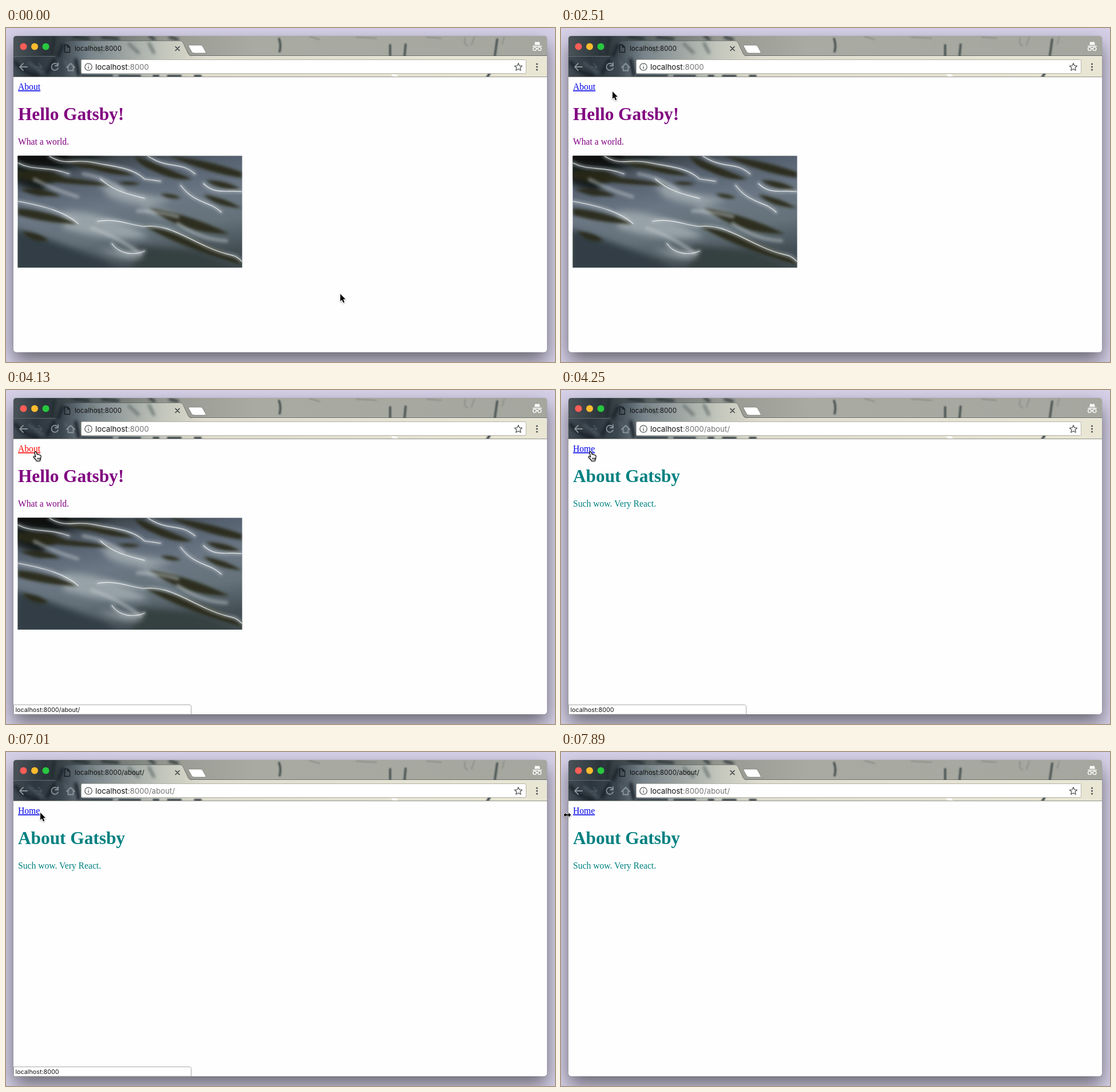
Write an HTML page that moves like this. It is 959 px wide and 584 px high and loops after 8 s.

```html
<!DOCTYPE html>
<html lang="en">
<head>
<meta charset="utf-8">
<title>localhost:8000</title>
<style>
  html, body { margin: 0; width: 100%; height: 100%; overflow: hidden; background: #d6d1e8; }
  #window { position: absolute; left: 13px; top: 14px; width: 932px; height: 553px; border-radius: 5px;
    background: #fefefe; box-shadow: 0 0 1px rgba(0,0,0,.5), 0 15px 32px rgba(0,0,0,.5); }
  svg { position: absolute; left: 0; top: 0; display: block; }
  .ui { font-family: Inter, Roboto, sans-serif; }
  .page { font: 15.65px "Liberation Serif", "Times New Roman", serif; }
  .heading { font-size: 31.3px; font-weight: bold; }
  .link { fill: #00e; text-decoration: underline; }
  .home { fill: purple; }
  .about { fill: teal; }
  .line { fill: none; stroke-linecap: round; stroke-linejoin: round; }
</style>
</head>
<body>
<div id="window"></div>
<svg width="959" height="584" viewBox="0 0 959 584">
  <defs>
    <clipPath id="header"><path d="M13 86V19q0-5 5-5H940q5 0 5 5V86Z"/></clipPath>
    <clipPath id="photoFrame"><rect x="20.5" y="223.5" width="392" height="195.5"/></clipPath>
    <linearGradient id="strip">
      <stop offset="0" stop-color="#4a5358"/><stop offset=".06" stop-color="#2b343a"/>
      <stop offset=".13" stop-color="#4c5657"/><stop offset=".2" stop-color="#757b77"/>
      <stop offset=".3" stop-color="#999b93"/><stop offset=".45" stop-color="#a9aaa1"/>
      <stop offset="1" stop-color="#a5a69e"/>
    </linearGradient>
    <linearGradient id="toolbar" gradientUnits="userSpaceOnUse" x1="13" x2="945" y1="0" y2="0">
      <stop offset="0" stop-color="#414b53"/><stop offset=".04" stop-color="#2d363e"/>
      <stop offset=".09" stop-color="#3a454d"/><stop offset=".14" stop-color="#77838a"/>
      <stop offset=".2" stop-color="#98a09f"/><stop offset=".28" stop-color="#c3c6bc"/>
      <stop offset=".36" stop-color="#dedccd"/><stop offset="1" stop-color="#e9e6d4"/>
    </linearGradient>
    <linearGradient id="water" x1=".1" y1="0" x2=".4" y2="1">
      <stop offset="0" stop-color="#2b302f"/><stop offset=".25" stop-color="#566170"/>
      <stop offset=".5" stop-color="#6b7784"/><stop offset=".75" stop-color="#65727a"/>
      <stop offset="1" stop-color="#434e55"/>
    </linearGradient>
    <filter id="soft"><feGaussianBlur stdDeviation="1.3"/></filter>
    <filter id="blur"><feGaussianBlur stdDeviation="2.4"/></filter>
    <filter id="haze"><feGaussianBlur stdDeviation="6"/></filter>
    <filter id="lift" x="-50%" y="-50%" width="200%" height="200%">
      <feDropShadow dx="0" dy="1" stdDeviation=".8" flood-opacity=".4"/>
    </filter>
  </defs>

  <!-- browser frame -->
  <g clip-path="url(#header)">
    <rect x="13" y="14" width="932" height="36" fill="url(#strip)"/>
    <g filter="url(#blur)" class="line" stroke="#1c252b" stroke-width="4">
      <path d="M84 16l-4 32M118 15l26 4M168 16l28 3M251 14l8 6M286 16l14 4"/>
    </g>
    <g filter="url(#soft)" class="line" stroke="#8c8e87" stroke-width="2">
      <path d="M477 19q4 10 1 22M671 30v18M698 29l-2 22M858 20l-4 28" stroke="#4f5959" stroke-width="4"/>
      <path d="M802 17q-3 12 4 14M818 16l-5 14M870 16l-3 12M530 15l18 5M612 16l35 2M735 16l25 2"/>
    </g>
    <path d="M13 49H85q3 0 5-4l7-18q2-5 6-5H303q5 0 7 5l8 18q2 4 6 4H945V86H13Z" fill="url(#toolbar)"/>
    <g filter="url(#blur)" class="line" stroke="#1b242b" stroke-width="6">
      <path d="M99 30l-8 18M17 60q12 18 38 23M84 56l-12 22M122 56l5 26"/>
      <path d="M146 27l20 14M215 28l16 15M250 27l8 16" stroke="#6e7977" stroke-width="5"/>
      <path d="M40 61l24 17M103 58l14 18" stroke="#586570" stroke-width="3"/>
    </g>
    <g filter="url(#soft)" class="line" stroke="#39434a" stroke-width="4">
      <path d="M133 83.500h52M198 84h36M258 84h8M283 84h22M330 84h10M845 79l-5 8"/>
    </g>
    <path d="M673 81h9l3 4h-9Z" fill="#fff"/>
    <path d="M13 48.500H85q3 0 5-4l7-17q2-5 6-5H303q5 0 7 5l8 17q2 4 6 4H945" class="line" stroke="#30383b" stroke-opacity=".5"/>
    <path d="M325 49.500H945" stroke="#f2f2ea"/>
    <path d="M13 49.500H86" stroke="#9aa2a4" stroke-opacity=".5"/>
    <path d="M13 85.500H945" stroke="#92938b"/>
  </g>
  <path d="M320 30h20q3 0 4 3l5 9q1 2-2 2h-18q-4 0-5-3l-5-9q-1-2 1-2Z" fill="#fff" stroke="#6e726d" stroke-width=".7"/>
  <circle cx="30.5" cy="32.5" r="6" fill="#fc5d57"/>
  <circle cx="50" cy="32.5" r="6" fill="#fdbc2e"/>
  <circle cx="69.5" cy="32.5" r="6" fill="#28c840"/>

  <g class="line" stroke-width="1.3">
    <path d="M102.5 29.5h5l4 4v9h-9ZM107.5 29.5v4h4" stroke="#161c20"/>
    <path d="M296 32.5l7 7M303 32.5l-7 7" stroke="#33383a" stroke-width="1.5"/>
    <g stroke="#8a949b" stroke-width="1.8">
      <path d="M37 68H24M30 62l-6 6 6 6"/>
      <path d="M50 68H62M57 62l6 6-6 6" stroke="#46515a"/>
      <path d="M90 64a6 6 0 1 0 1 6M91 61v5h-5"/>
      <path d="M106 69l7-7 7 7M108.500 68v6.500h9V68"/>
    </g>
  </g>
  <g fill="#fff">
    <path d="M920 31h16v1.500h-16ZM923 29.500l1.500-5.500q3.500 1.500 7 0l1.500 5.500Z"/>
    <g class="line" stroke="#fff" stroke-width="1.4">
      <circle cx="923.500" cy="36.500" r="2.900" fill="none"/><circle cx="932" cy="36.500" r="2.900" fill="none"/><path d="M926.500 36q1.300-1 2.600 0"/>
    </g>
  </g>
  <rect x="131.5" y="55.500" width="777" height="24" rx="2" fill="#fff" stroke="#b4b3a8"/>
  <g class="line" stroke="#55585a" stroke-width="1.3">
    <circle cx="144" cy="68" r="6.200"/><path d="M144 67.500v3.500M144 64.700v.1"/>
    <path d="M895 61.500l1.900 4.400 4.800.4-3.600 3.200 1.100 4.700-4.200-2.500-4.200 2.500 1.100-4.700-3.600-3.200 4.800-.4Z"/>
  </g>
  <g fill="#505254"><circle cx="927.500" cy="63" r="1.600"/><circle cx="927.500" cy="68" r="1.600"/><circle cx="927.500" cy="73" r="1.600"/></g>
  <text id="title" class="ui" x="120" y="40" font-size="11.600" fill="#111"></text>
  <text class="ui" x="156" y="72.500" font-size="13.250" fill="#111">localhost<tspan id="address" fill="#757575"></tspan></text>

  <!-- pages -->
  <g id="homePage" class="page">
    <text id="aboutLink" class="link" x="21" y="108">About</text>
    <text class="home heading" x="21" y="161">Hello Gatsby!</text>
    <text class="home" x="21" y="204">What a world.</text>
    <g clip-path="url(#photoFrame)">
      <rect x="20" y="223" width="393" height="197" fill="url(#water)"/>
      <g filter="url(#haze)">
        <path d="M15 218H190L90 250 60 290 15 270Z" fill="#171b1b"/>
        <path d="M15 350L90 375 170 405 200 425H15Z" fill="#333d44"/>
        <path d="M230 380L330 390 420 425H220Z" fill="#363f40"/>
        <path d="M160 270q60 20 130 30-50 20-110-5ZM100 320q80 0 150 45-70 10-150-15ZM230 310q50 5 70 20-40 5-70-20ZM160 385q30 5 80 10-20 20-80-10Z" fill="#97a2a8"/>
      </g>
      <g filter="url(#blur)" fill="#282a14" fill-opacity=".92">
        <path d="M15 220H105Q120 238 90 238 60 240 21 232Z" fill="#0c0e09"/>
        <path d="M108 232Q165 233 225 257 195 260 150 246 120 243 108 232Z"/>
        <path d="M21 250Q70 246 105 262 150 266 190 275 140 276 90 270 50 272 21 262Z"/>
        <path d="M195 270q20-4 40 2-18 6-40-2Z"/>
        <path d="M285 224Q350 230 412 252V262Q355 254 285 224Z"/>
        <path d="M225 224Q275 242 325 264 295 268 258 250 232 240 225 224Z"/>
        <path d="M350 266Q385 266 410 282 370 284 350 266ZM345 291Q380 296 412 315 365 312 345 291ZM270 290q20-2 36 7-22 4-36-7Z"/>
        <path d="M21 315Q75 320 128 343 70 341 21 327ZM28 356q30 1 46 16-28 4-46-16ZM25 282q45-4 70 12-45 2-70-12Z"/>
        <path d="M250 315Q320 325 390 360 310 360 250 315ZM240 345Q300 352 412 407V414Q300 382 240 345Z"/>
      </g>
      <g filter="url(#blur)" class="line" stroke="#c2cacd" stroke-opacity=".5" stroke-width="6">
        <path d="M135 255Q175 262 205 284M50 265Q85 283 125 295M230 320Q265 320 300 330M150 350Q195 365 235 395M300 342Q340 370 385 372"/>
        <path id="crests" d="M21 236C48 250 72 241 110 255M76 224C104 242 120 228 152 235S220 243 242 264L270 268M248 224C284 248 304 232 330 255M345 272C365 292 385 283 412 286M165 264C190 286 212 290 242 298M21 303C70 312 104 322 126 342M160 338C190 332 215 344 240 347M240 347C280 343 302 360 350 382S393 390 412 408M185 377C198 396 224 398 242 390M305 275C330 308 355 302 376 322"/>
      </g>
      <use href="#crests" class="line" stroke="#fff" stroke-opacity=".8" stroke-width="1.2"/>
    </g>
  </g>
  <g id="aboutPage" class="page">
    <text class="link" x="21" y="108">Home</text>
    <text class="about heading" x="21" y="161">About Gatsby</text>
    <text class="about" x="21" y="204">Such wow. Very React.</text>
  </g>

  <g id="status">
    <path d="M13.500 567V550.500H320.500q3 0 3 3V567Z" fill="#fff" stroke="#a9a9a9"/>
    <text id="statusText" class="ui" x="16.500" y="562.800" font-size="10.750" fill="#111"></text>
  </g>

  <!-- pointers, hotspot at 0,0 -->
  <g id="pointer" filter="url(#lift)" stroke-linejoin="round">
    <path id="arrow" d="M0 0V12.800L2.900 10.200 5.100 15.300 7.200 14.400 5.100 9.300H9Z" stroke="#fff" stroke-width="1.800" paint-order="stroke"/>
    <path id="hand" transform="translate(-3 -1)" fill="#fff" stroke="#000" stroke-width="1.100"
      d="M3 2.500C2.800.5 5.300.3 6 2.200L7.300 6C8 5 9.500 5.300 9.800 6.400 10.800 5.700 12 6.200 12.300 7.200 13.500 6.800 14.200 8 14 9.500L13.300 13.500 12 17H6.500C5.500 14 3 12.500 1.300 10.800.4 9.500 2 8.300 3.300 9.200L4.900 10.300ZM8 11.500v3M10 11.500v3M11.900 11.500v3"/>
    <path id="resize" d="M-6.500 0L-2.500-4V-1.200H2.500V-4L6.500 0 2.500 4V1.200H-2.500V4Z" stroke="#fff" stroke-width="1.600" paint-order="stroke"/>
  </g>
</svg>
<script>
const DURATION = 8000;
const CLICK = 4130, NAVIGATE = 4250, RETITLE = 4430;
const HOVER = 2940, LEAVE_WINDOW = 7830;
const start = [584, 465];
// Each move advances in evenly spaced steps; power above 1 slows it towards the end.
const moves = [
  { from: 810, to: 810, steps: 1, x: 582, y: 463 },
  { from: 980, to: 1040, steps: 2, x: 317, y: 244 },
  { from: 1340, to: 1690, steps: 7, x: 276, y: 175 },
  { from: 1990, to: 2160, steps: 3, x: 140, y: 122 },
  { from: 2340, to: 2800, steps: 9, x: 50, y: 108, power: 1.4, powerY: 2.6 },
  { from: 7010, to: 7010, steps: 1, x: 60, y: 106 },
  { from: 7080, to: 7770, steps: 11, x: 14, y: 105, power: 2 },
  { from: LEAVE_WINDOW, to: 7890, steps: 2, x: 10.5, y: 110 }
];
const $ = id => document.getElementById(id);
const show = (id, visible) => $(id).style.display = visible ? "" : "none";
const clamp = v => Math.max(0, Math.min(1, v));
const setText = (id, text) => { if ($(id).textContent !== text) $(id).textContent = text; };

function pointerAt(t) {
  let [x, y] = start;
  for (const { from, to, steps, x: endX, y: endY, power = 1, powerY = power } of moves) {
    if (t < from) break;
    const progress = (t - from) / (to - from || 1) * (steps - 1);
    const left = 1 - Math.min(steps, Math.floor(progress + 0.1) + 1) / steps;
    x = endX + (x - endX) * left ** power;
    y = endY + (y - endY) * left ** powerY;
  }
  return [x, y];
}

function statusOpacity(t) {
  if (t < HOVER) return 0;
  return t < 3000 ? 0.5 : clamp((7890 - t) / 140);
}

function render(t) {
  const [x, y] = pointerAt(t);
  const outside = t >= LEAVE_WINDOW;
  const onLink = t >= HOVER && x > 20 && x < 60;
  $("pointer").setAttribute("transform", `translate(${Math.round(x)} ${Math.round(y)})`);
  show("resize", outside);
  show("hand", !outside && onLink);
  show("arrow", !outside && !onLink);

  const navigated = t >= NAVIGATE;
  show("homePage", !navigated);
  show("aboutPage", navigated);
  $("aboutLink").style.fill = t >= CLICK ? "red" : "";
  setText("address", navigated ? ":8000/about/" : ":8000");
  setText("title", t >= RETITLE ? "localhost:8000/about/" : "localhost:8000");
  setText("statusText", navigated ? "localhost:8000" : "localhost:8000/about/");
  $("status").style.opacity = statusOpacity(t);
}

function tick() {
  render(performance.now() % DURATION);
  requestAnimationFrame(tick);
}
tick();
</script>
</body>
</html>
```
